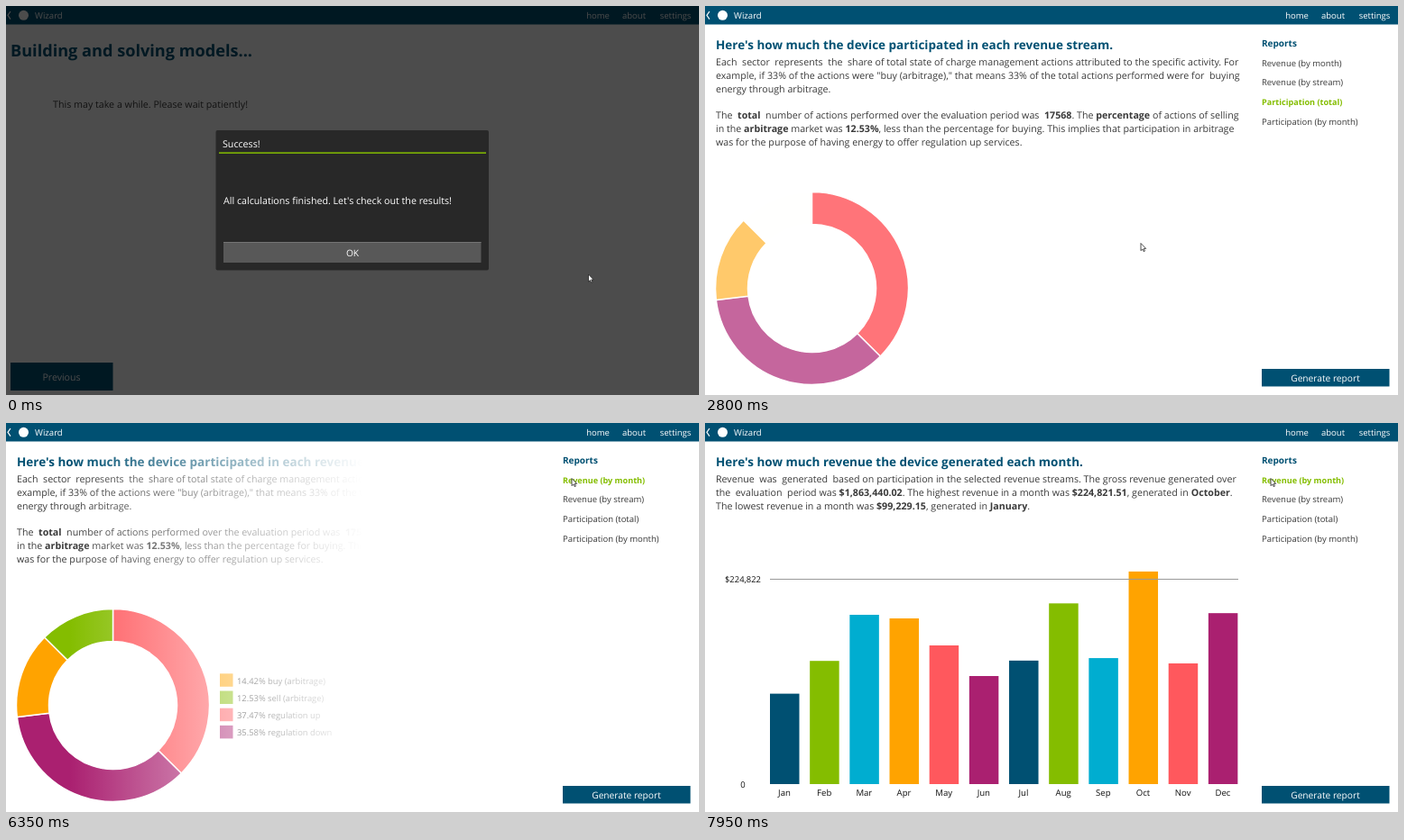
These frames come from a looping animation (768 px wide and 432 px high, 8 s). An HTML page:

```html
<!DOCTYPE html>
<html lang="en">
<head>
<meta charset="utf-8">
<title>Wizard reports</title>
<style>
html, body { margin: 0; width: 100%; height: 100%; overflow: hidden; background: #fff; }
svg { display: block; width: 768px; height: 432px; }
text { font-family: "Open Sans", "Noto Sans", sans-serif; white-space: pre; text-rendering: geometricPrecision; }
.b { font-weight: 700; }
.mid { text-anchor: middle; }
.end { text-anchor: end; }
</style>
</head>
<body>
<svg id="stage" viewBox="0 0 768 432"></svg>
<script>
const BLUE = '#005072', GREEN = '#84bd00', CYAN = '#00add0',
      ORANGE = '#ffa300', RED = '#ff585d', PURPLE = '#aa2070';
const BODY = '#3a3a3a';

// y is the middle of the capital letters; *word* is bold
const text = (x, y, size, str, fill, cls = '') =>
  `<text x="${x}" y="${y + 0.36 * size}" font-size="${size}" fill="${fill}" class="${cls}">` +
  str.replace(/\*(.+?)\*/g, '<tspan class="b">$1</tspan>') + '</text>';
const rect = (x, y, w, h, fill, more = '') =>
  `<rect x="${x}" y="${y}" width="${w}" height="${h}" fill="${fill}" ${more}/>`;
const group = (id, inner, more = '') => `<g id="${id}" ${more}>${inner}</g>`;
const lines = arr => arr.map((s, i) => text(12, 62 + 14.9 * i, 10.68, s, BODY)).join('');

// Waiting page
const waiting = rect(0, 21, 768, 411, '#fff') +
  text(5, 49, 18.15, 'Building and solving models...', BLUE, 'b') +
  text(52, 109.5, 10.68, 'This may take a while. Please wait patiently!', BODY) +
  rect(5, 396, 113.5, 31, BLUE) +
  text(61.5, 412, 10.6, 'Previous', '#fff', 'mid');

// Sidebar
const items = ['Revenue (by month)', 'Revenue (by stream)', 'Participation (total)', 'Participation (by month)'];
const sidebar = text(617, 41, 10, 'Reports', BLUE, 'b') +
  items.map((s, i) => {
    const y = 63.3 + 21.6 * i;
    return group('off' + i, text(617, y, 9.5, s, BODY)) +
           group('on' + i, text(617, y, 9.1, s, GREEN, 'b'), 'opacity="0"');
  }).join('') +
  rect(617, 403, 141.5, 19.5, BLUE) +
  text(687.5, 413, 10.2, 'Generate report', '#fff', 'mid');

// Participation report
const slices = [[37.47, RED], [35.58, PURPLE], [14.42, ORANGE], [12.53, GREEN]];
let turn = 0;
const donut = slices.map(([pct, fill], i) => {
  const a = turn * Math.PI / 50, b = (turn += pct) * Math.PI / 50, big = +(pct > 50);
  const at = (ang, r) => `${118.5 + r * Math.sin(ang)} ${313.5 - r * Math.cos(ang)}`;
  return `<path id="slice${i}" fill="${fill}" stroke="#fff" stroke-width="1.5" d="M${at(a, 107)}
    A107 107 0 ${big} 1 ${at(b, 107)}L${at(b, 71)}A71 71 0 ${big} 0 ${at(a, 71)}Z"/>`;
}).join('');
const legend = [['14.42% buy (arbitrage)', ORANGE], ['12.53% sell (arbitrage)', GREEN],
                ['37.47% regulation up', RED], ['35.58% regulation down', PURPLE]]
  .map(([s, fill], i) => group('key' + i,
    rect(237, 278.3 + 19.2 * i, 14.5, 14.5, fill) +
    text(256, 286.5 + 19.2 * i, 9.4, s, '#111'))).join('');
const participation =
  text(12, 43.5, 13.5, "Here's how much the device participated in each revenue stream.", BLUE, 'b') +
  lines([
    'Each  sector  represents  the  share of total state of charge management actions attributed to the specific activity. For',
    'example, if 33% of the actions were "buy (arbitrage)," that means 33% of the total actions performed were for  buying',
    'energy through arbitrage.',
    '',
    'The  *total*  number of actions performed over the evaluation period was  *17568*. The *percentage* of actions of selling',
    'in the *arbitrage* market was *12.53%*, less than the percentage for buying. This implies that participation in arbitrage',
    'was for the purpose of having energy to offer regulation up services.'
  ]) + donut + legend;

// Revenue report
const months = 'Jan Feb Mar Apr May Jun Jul Aug Sep Oct Nov Dec'.split(' ');
const heights = [100.4, 136.8, 188, 184, 154, 120, 137, 199, 137, 227.5, 127, 177];
const barFills = [BLUE, GREEN, CYAN, ORANGE, RED, PURPLE];
const revenue =
  text(12, 43.5, 13.5, "Here's how much revenue the device generated each month.", BLUE, 'b') +
  lines([
    'Revenue  was  generated  based on participation in the selected revenue streams. The gross revenue generated over',
    'the  evaluation  period was *$1,863,440.02*. The highest revenue in a month was *$224,821.51*, generated in *October*.',
    'The lowest revenue in a month was *$99,229.15*, generated in *January*.'
  ]) +
  months.map((m, i) => {
    const x = 72 + 44.17 * i;
    return rect(x, 401, 32.5, 0, barFills[i % 6], `id="bar${i}"`) +
           text(x + 16, 411, 9.6, m, '#111', 'mid');
  }).join('') +
  rect(72, 173, 519, 1, '#999') +
  text(62, 174, 9.43, '$224,822', '#111', 'end') + text(42, 401.5, 9.5, '0', '#111', 'mid');

const header = rect(0, 0, 768, 20.5, BLUE) +
  '<path d="M5 6L2 10.3L5 14.6" fill="none" stroke="#fff" stroke-width="1.2"/>' +
  '<circle cx="19.5" cy="10.3" r="5.5" fill="#fff"/>' +
  text(32, 10.7, 9.6, 'Wizard', '#fff') +
  [['home', 656], ['about', 696], ['settings', 742]]
    .map(([s, x]) => text(x, 10.7, 9.5, s, '#fff', 'mid')).join('');

const popup = rect(232.5, 138, 302.5, 155.5, '#111', 'rx="2" opacity=".6"') +
  rect(233.5, 139, 300.5, 153.5, '#282828', 'rx="1"') +
  text(240, 153, 10.68, 'Success!', '#fff') +
  rect(236, 162.3, 296, 1.7, GREEN, 'opacity=".88"') +
  text(241, 216, 10.68, "All calculations finished. Let's check out the results!", '#fff') +
  rect(241, 262, 285.5, 23, '#585858', 'id="ok"') + rect(241, 262, 285.5, 1, '#747474') +
  text(384, 274, 10.2, 'OK', '#fff', 'mid');

const arrow = '<path d="M0 0V8.2L1.9 6.5L3.2 9.2L4.5 8.6L3.2 5.9H5.7Z" fill="#fff" stroke="#222" stroke-width=".8"/>';

document.getElementById('stage').innerHTML = `<defs>
  <linearGradient id="fade" gradientUnits="userSpaceOnUse">
    <stop offset="0" stop-color="#fff"/><stop offset="1" stop-color="#000"/>
  </linearGradient>
  <mask id="wipe" maskUnits="userSpaceOnUse" x="0" y="0" width="768" height="432">
    ${rect(0, 0, 768, 432, 'url(#fade)')}
  </mask></defs>` + rect(0, 0, 768, 432, '#fff') +
  group('waiting', waiting) +
  group('reports', sidebar + group('participation', participation, 'mask="url(#wipe)"') + group('revenue', revenue)) +
  header + rect(0, 0, 768, 432, '#000', 'id="dim"') + group('popup', popup) + group('cursor', arrow);

const $ = id => document.getElementById(id);
const set = (id, name, value) => $(id).setAttribute(name, value);
const show = (id, on) => set(id, 'display', on ? 'inline' : 'none');
const ramp = (t, start, dur) => Math.min(1, Math.max(0, (t - start) / dur));
const outQuad = x => x * (2 - x);
const inOut = x => x * x * (3 - 2 * x);
const outBack = x => { const p = x - 1; return p * p * (2.70158 * p + 1.70158) + 1; };

// Cursor moves: start, duration, destination
const moves = [[20, 340, 475, 271.5], [2600, 150, 483, 263.5], [4300, 680, 583, 73], [5000, 450, 627, 61.5]];
const sliceStarts = [2450, 2540, 2590, 2800];

function draw(t) {
  // Popup closes while the pages slide
  set('dim', 'opacity', 0.7 * (1 - ramp(t, 600, 104)));
  set('ok', 'fill', t >= 500 && t < 600 ? '#32a4ce' : '#585858');
  show('popup', t < 710);
  const slide = 768 * outQuad(ramp(t, 590, 710));
  set('waiting', 'transform', `translate(${-slide})`);
  set('reports', 'transform', `translate(${768 - slide})`);

  // Selected report
  const total = ramp(t, 1530, 120), month = ramp(t, 5830, 120);
  [month, 0, total * (1 - month), 0].forEach((v, i) => {
    set('on' + i, 'opacity', v);
    set('off' + i, 'opacity', 1 - v);
  });

  show('participation', t >= 2400 && t < 6650);
  const edge = 762 - 924 * ramp(t, 5950, 700);
  set('fade', 'x1', edge - 162);
  set('fade', 'x2', edge + 162);
  sliceStarts.forEach((s, i) => {
    set('slice' + i, 'opacity', outQuad(ramp(t, s, 600)));
    set('key' + i, 'opacity', outQuad(ramp(t, 3000 + 100 * i, 600)));
  });

  show('revenue', t >= 6650);
  heights.forEach((full, i) => {
    const h = full * outBack(ramp(t, 6676 + 50 * i, 1000));
    set('bar' + i, 'y', 401 - h);
    set('bar' + i, 'height', Math.max(0, h));
  });

  let x = 645.5, y = 298;
  for (const [start, dur, toX, toY] of moves) {
    const k = inOut(ramp(t, start, dur));
    x += (toX - x) * k;
    y += (toY - y) * k;
  }
  set('cursor', 'transform', `translate(${x} ${y})`);
}

const begin = performance.now();
function tick() {
  draw((performance.now() - begin) % 8000);
  requestAnimationFrame(tick);
}
tick();
</script>
</body>
</html>
```
